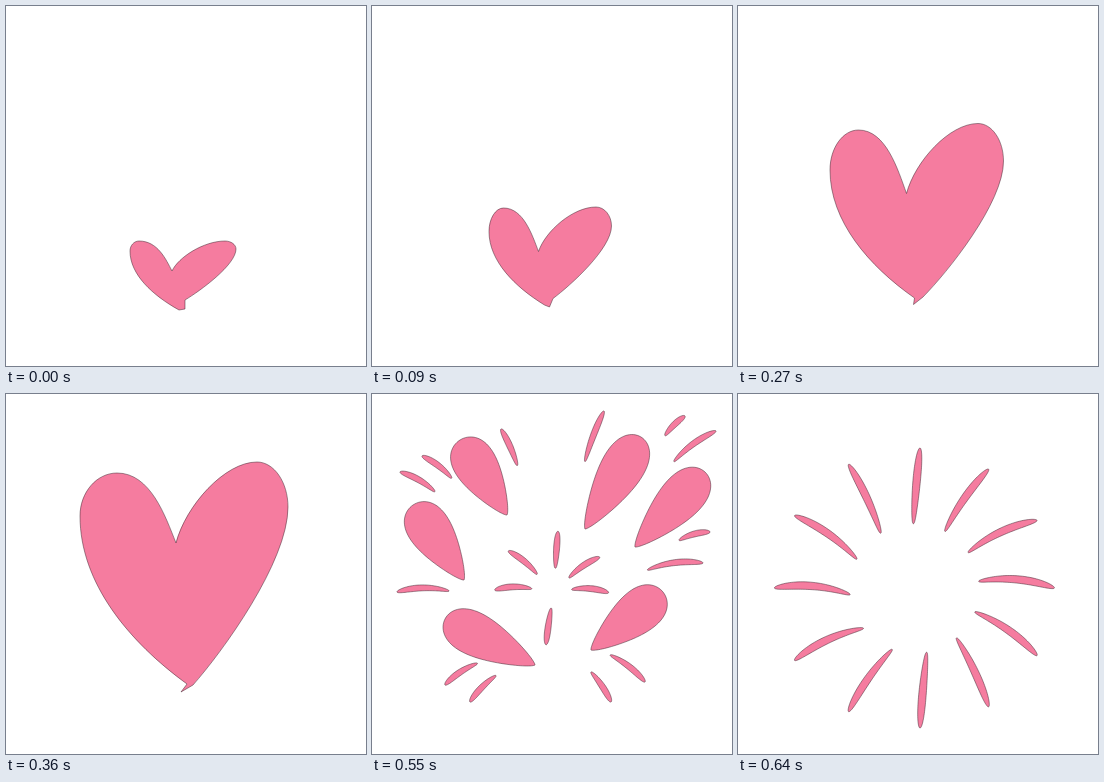
An HTML page with a canvas that plays this animation: 360x360 px, repeating every 730 ms.

```html
<!DOCTYPE html>
<html lang="en">
<head>
<meta charset="utf-8">
<title>Heart burst</title>
<style>
  html, body { margin: 0; width: 100%; height: 100%; overflow: hidden; background: #fff; }
  canvas { display: block; width: 360px; height: 360px; }
</style>
</head>
<body>
<canvas id="stage" width="360" height="360"></canvas>
<script>
const ctx = document.getElementById('stage').getContext('2d');
const LOOP = 730;
const STARTS = [0, 90, 180, 270, 360, 450, 550, 640];
const HUB = [182, 194];
const RAD = Math.PI / 180;

// Each heart: notch, left top, left edge, left tip, tail, right tip, right edge, right top.
const growth = [
  [[166,265], [133,235], [124,245], [173,304], [179,303], [179,294], [230,243], [219,235]],
  [[167,226], [130,169], [110,206], [172,294], [176,299], [183,291], [249,197], [229,167]],
  [[170,149], [111,79], [74,122], [181,290], [175,298], [187,291], [282,113], [251,68]]
];
const core =
  [[171,164], [146,159], [128,172], [180,227], [182,228], [186,222], [199,164], [188,154]];

// Petals run from tip to head: x, y, x, y.
const closed = [
  [104,198, 63,93], [139,150, 130,67], [213,160, 240,59],
  [266,176, 302,58], [185,287, 111,213], [193,285, 253,182]
];
const open = [
  [92,186, 41,111], [135,121, 88,46], [213,135, 269,43],
  [263,153, 333,78], [163,271, 73,225], [219,256, 291,198]
];

// Streaks by outer end and length; their direction follows from the hub.
const sparks = [
  [89,42,17], [141,27,47], [283,20,29], [316,177,38], [304,248,42], [76,291,43], [49,190,40]
];
const flares = [
  [28,78,40], [50,62,37], [129,35,40], [232,17,54], [313,22,28], [344,37,52], [338,138,32],
  [331,169,56], [273,288,44], [239,308,36], [98,308,37], [73,291,39], [25,198,52]
];

const mix = (a, b, u, v = u) => [a[0] + (b[0] - a[0]) * u, a[1] + (b[1] - a[1]) * v];

function paint() {
  ctx.closePath();
  ctx.fill();
  ctx.stroke();
}

// Half a heart: level at the top, upright at the outer edge.
function half(notch, top, edge, tip, [nx, ny, t, e, px, py]) {
  return [
    notch, mix(notch, top, nx, ny), mix(top, notch, t, 0),
    top, mix(top, edge, 0.55, 0), mix(edge, top, 0, 0.55),
    edge, mix(edge, tip, 0, e), mix(tip, edge, px, py), tip
  ];
}

function trace(p) {
  ctx.lineTo(...p[0]);
  for (let i = 1; i < p.length; i += 3) ctx.bezierCurveTo(...p[i], ...p[i + 1], ...p[i + 2]);
}

function heart([notch, lTop, lEdge, lTip, tail, rTip, rEdge, rTop]) {
  ctx.beginPath();
  trace(half(notch, lTop, lEdge, lTip, [0.18, 0.38, 0.57, 0.4, 0.54, 0.25]));
  ctx.lineTo(...tail);
  trace(half(notch, rTop, rEdge, rTip, [0.12, 0.46, 0.4, 0.31, 0.3, 0.18]).reverse());
  paint();
}

function grow(u) {
  const from = growth[Math.floor(u)], to = growth[Math.ceil(u)];
  heart(from.map((p, i) => mix(p, to[i], u % 1)));
}

// A tapered shape along a bent spine; a lower taper gives a more even width.
function drop(x1, y1, x2, y2, width, taper, bend = 0) {
  const dx = x2 - x1, dy = y2 - y1, len = Math.hypot(dx, dy);
  const profile = t => Math.pow(t, taper) * Math.sqrt(1 - t * t * t);
  const scale = width / 2 / profile(Math.cbrt(2 * taper / (2 * taper + 3)));
  const steps = 48;
  ctx.beginPath();
  for (let i = -steps; i < steps; i++) {
    const t = (1 - Math.cos(Math.PI * i / steps)) / 2;
    const slope = 4 * bend * (1 - 2 * t) / len;
    const r = Math.sign(i) * scale * profile(t) / Math.hypot(1, slope);
    const along = t * len - r * slope;
    const across = 4 * bend * t * (1 - t) + r;
    ctx.lineTo(x1 + (dx * along - dy * across) / len, y1 + (dy * along + dx * across) / len);
  }
  paint();
}

const petals = (list, width) => list.forEach(p => drop(...p, width, 0.75));

// Points at the hub, arching upwards; flat levels the direction, turn twists it.
function streak(x, y, len, width, flat = 1, turn = 0) {
  const a = Math.atan2((HUB[1] - y) * flat, HUB[0] - x) + turn * RAD;
  const dx = Math.cos(a) * len, dy = Math.sin(a) * len;
  drop(x + dx, y + dy, x, y, width, 0.42, 0.07 * dx);
}

function ring(angles, radius, ...look) {
  for (const a of angles) {
    const c = Math.cos(a * RAD), r = radius * (1 - 0.04 * c);
    streak(HUB[0] + r * c, HUB[1] + r * Math.sin(a * RAD), ...look);
  }
}

function burst(stage) {
  if (stage === 0) {
    petals(closed, 48);
    heart(core);
    sparks.forEach(s => streak(...s, 6));
  } else if (stage === 1) {
    petals(open, 43);
    flares.forEach(s => streak(...s, 6, 0.75));
    ring([-86, -34, 5, 98, 178, 219], 57, 37, 6);
  } else {
    ring(Array.from({ length: 12 }, (_, i) => i * 30), 140, 76, 7.5, 1, 5);
  }
}

function tick() {
  const t = performance.now() % LOOP;
  const step = STARTS.filter(s => s <= t).length - 1;
  ctx.fillStyle = '#fff';
  ctx.fillRect(0, 0, 360, 360);
  ctx.fillStyle = '#f57c9f';
  ctx.strokeStyle = 'rgba(60, 35, 45, 0.7)';
  ctx.lineWidth = 0.7;
  ctx.lineJoin = 'round';
  if (step < 5) grow(step / 2);
  else burst(step - 5);
  requestAnimationFrame(tick);
}
tick();
</script>
</body>
</html>
```
